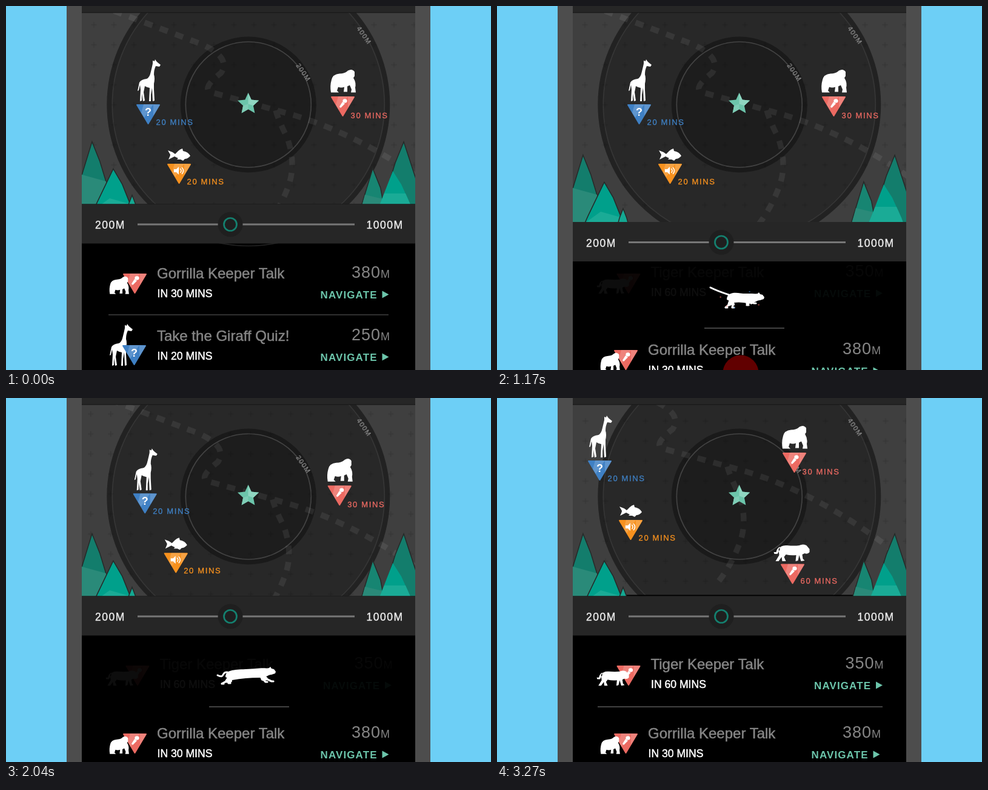
Write an HTML page that moves like this. It is 800x600 px and loops after 3.3 s.

```html
<!DOCTYPE html>
<html lang="en">
<head>
<meta charset="utf-8">
<title>Pull to refresh</title>
<style>
  html, body { margin: 0; width: 100%; height: 100%; overflow: hidden; background: #6dcff6; }
  svg { display: block; font-family: "Liberation Sans", Arial, sans-serif; }
  .title { font-size: 24px; fill: #858585; stroke: #858585; stroke-width: .5px; }
  .when { font-size: 17.6px; fill: #fff; stroke: #fff; stroke-width: .5px; }
  .go { font-size: 17px; font-weight: bold; letter-spacing: 1.1px; fill: #6cc5ab; }
  .far { font-size: 27px; letter-spacing: 1px; fill: #858585; }
  .unit { font-size: 18px; letter-spacing: 0; }
  .range { font-size: 17.5px; letter-spacing: 1.5px; fill: #eee; stroke: #eee; stroke-width: .4px; }
  .mins { font-size: 13px; letter-spacing: 1.65px; stroke-width: .3px; }
  .ring { font-size: 11px; letter-spacing: 1.5px; fill: #8c8c8c; stroke: #8c8c8c; stroke-width: .2px; }
</style>
</head>
<body>
<svg id="stage" width="800" height="600" viewBox="0 0 800 600"></svg>
<script>
const BLUE = '#3f80c4', RED = '#ec6a62', ORANGE = '#f7911e', TEAL = '#6cc5ab';

const shapes = {
  giraffe: 'M25 2L28 3L29 0L31 3L33 5L38 9L36 12L30 11Q27 17 27 25Q29 31 27 40L27 50L28 68L25 69L24 47L22 58L22 69L19 69L20 47Q15 46 12 44L10 54L12 68L9 69L7 56L7 68L4 69L5 50L4 42L2 51L0 52L3 38Q6 33 15 32Q20 30 22 20Q24 12 25 7Z',
  gorilla: 'M29 2Q36 -2 40 4L40 11L38 14Q43 22 41 30L42 38L34 38L35 33L32 26L28 28L28 37L22 37L23 29Q18 31 13 29L11 35L14 38L1 38Q-1 27 2 17Q4 8 15 7Q24 7 29 2Z',
  fish: 'M0 3Q7 5 12 9L17 4Q20 1 24 0L25 4Q33 5 37 12Q33 17 28 17L25 20L21 18L15 18L17 16L11 13Q7 15 1 18Q4 12 4 10Z',
  tiger: 'M8 8Q12 1 22 2Q34 3 42 2Q48 -1 54 2L59 8L59 13Q56 17 51 15L47 17L48 24L51 27L45 28L42 18L40 27L36 28L37 18Q28 19 20 17L17 21L20 28L14 28L13 21L8 28L3 28L9 18ZM10 4Q5 7 4 13L0 13L1 16L6 16L10 9Z'
};

const icons = {
  quiz: '<text x="19.5" y="19" text-anchor="middle" font-size="18" font-weight="bold" fill="#fff">?</text>',
  talk: '<ellipse cx="23" cy="7.5" rx="3.6" ry="3.2" fill="#fff"/><path d="M19 9L23 12L16 19L14 17Z" fill="#fff"/>',
  sound: '<path d="M11 9h4l4-4v13l-4-4h-4z" fill="#fff"/><path d="M21.5 8q3 3.5 0 7M24 6q5 5.5 0 11" fill="none" stroke="#fff" stroke-width="1.5"/>'
};

const animal = (name, x, y, scale = 1) =>
  `<path d="${shapes[name]}" fill="#fff" transform="translate(${x} ${y}) scale(${scale})"/>`;

const badge = (x, y, color, icon) => `<g transform="translate(${x} ${y})">
  <path d="M1 1H38L19.5 32Z" fill="${color}" stroke="${color}" stroke-width="2" stroke-linejoin="round"/>
  <path d="M12 0L28 0L13 22L8 14ZM28 0L39 1L28 19Z" fill="#fff" opacity=".17"/>${icons[icon]}</g>`;

const marker = (name, ax, ay, bx, by, color, icon, mins, drop = 34) =>
  animal(name, ax, ay) + badge(bx, by, color, icon) +
  `<text class="mins" x="${bx + 32.5}" y="${by + drop}" fill="${color}" stroke="${color}">${mins} MINS</text>`;

const row = (title, mins, far, art) => `${art}
  <text class="title" x="249" y="449">${title}</text>
  <text class="when" x="249.5" y="480">IN ${mins} MINS</text>
  <text class="far" x="633" y="448" text-anchor="end">${far}<tspan class="unit">M</tspan></text>
  <text class="go" x="518.5" y="481.5">NAVIGATE</text><path d="M620.5 469.5L631.5 475.500L620.5 481.5Z" fill="${TEAL}"/>`;

const disc = (r, fill, stroke = 'none') =>
  `<circle cx="399.8" cy="162.5" r="${r}" fill="${fill}" stroke="${stroke}" stroke-width="1.7"/>`;

const poly = (points, fill) => `<polygon points="${points}" fill="${fill}"/>`;

const star = () => {
  const at = i => {
    const r = i % 2 ? 8.8 : 18.5, a = (i / 5 - .5) * Math.PI;
    return [399.5 + r * Math.cos(a), 161.5 + r * Math.sin(a)].map(v => v.toFixed(1)).join();
  };
  const ids = [...Array(10).keys()];
  return poly(ids.map(at).join(' '), TEAL) +
    poly([at(0), at(1), at(2), at(3), '399.5,161.5'].join(' '), '#8fd6c1') +
    poly([at(5), at(6), at(7), '399.5,161.5'].join(' '), '#7fcdb6');
};

// A tree has a dark outline behind it and a lighter facet at its foot
const tree = (outline, fill, facet, light) =>
  `<polygon points="${outline}" fill="none" stroke="#252928" stroke-width="3"/>` +
  poly(outline, fill) + poly(facet, light);

const trees =
  tree('110,330 142,226 154,256 165,292 182,380 110,380', '#137d6c',
    '110,274 125,278 165,289 182,380 110,380', '#2a8a79') +
  tree('177,270 191,294 205,329 224,380 126,380 151,324', '#00a08b',
    '146,335 171,317 203,326 224,380 126,380', '#1aab96') +
  tree('208,314 213,327 228,380 188,380 203,327', '#14a892', '', 'none') +
  tree('690,330 656,226 643,258 630,300 610,380 690,380', '#137d6c', '', 'none') +
  tree('605,270 617,300 632,380 572,380 588,326', '#178572',
    '592,311 621,318 632,380 572,380 588,326', '#2a8a79') +
  poly('638,272 652,294 667,327 686,380 594,380 617,326', '#00a08b') +
  poly('624,309 659,309 667,327 686,380 594,380 617,326', '#1aab96');

const road = 'M178 8L320 62Q372 84 355 110Q322 136 338 142L475 180Q598 217 720 312M445 172Q450 190 463 215Q478 255 468 290Q455 330 430 362';

stage.innerHTML = `
<defs>
  <pattern id="plus" x="128.5" y="14.5" width="33" height="33" patternUnits="userSpaceOnUse">
    <path d="M12 16.5h9M16.5 12v9" stroke="#000" stroke-opacity=".13" stroke-width="1.6"/></pattern>
  <clipPath id="listArea"><path d="M125 380H675V600H125Z"/></clipPath>
  <clipPath id="below"><path d="M125 391H675V600H125Z"/></clipPath>
</defs>
<rect x="125" width="550" height="600" fill="#3f3f3f"/>
${disc(233.5, '#222')}${disc(224.5, '#282828', '#363636')}${disc(112, '#1a1a1a')}${disc(103.5, '#1d1d1d', '#434343')}
<g id="ground">
  <rect x="100" y="0" width="680" height="480" fill="url(#plus)"/>
  <path d="${road}" fill="none" stroke="#fff" stroke-opacity=".07" stroke-width="9.5" stroke-dasharray="14 13"/>
</g>
<text class="ring" transform="translate(478 98) rotate(55)">200M</text>
<text class="ring" transform="translate(578 37) rotate(55)">400M</text>
${star()}
<g id="markers">
  ${marker('giraffe', 217, 88, 215, 162, BLUE, 'quiz', 20)}
  ${marker('gorilla', 535, 104.5, 536, 149, RED, 'talk', 30, 36)}
  ${marker('fish', 267, 235, 266, 260, ORANGE, 'sound', 20)}
  <g id="newMarker">${marker('tiger', 521.5, 300, 533, 332.5, RED, 'talk', 60, 32.5)}</g>
</g>
<path id="edge" d="M125 325.5H675" stroke="#000" stroke-width="2"/>
<g id="forest">${trees}</g>
<rect id="sheet" x="125" y="326" width="550" height="400" fill="#000"/>
<g clip-path="url(#listArea)">
  <g id="ghost">${row('Tiger Keeper Talk', 60, 350, badge(193, 443, RED, 'talk') + animal('tiger', 160, 451, .9))}</g>
  <g id="rows">
    ${row('Gorrilla Keeper Talk', 30, 380, badge(193, 441, RED, 'talk') + animal('gorilla', 170.5, 445.5, .77))}
    <path d="M169 509H631" stroke="#303030" stroke-width="2"/>
    <g transform="translate(0 103)">${row('Take the Giraff Quiz!', 20, 250, animal('giraffe', 171, 421) + badge(192, 456, BLUE, 'quiz'))}</g>
  </g>
  <path id="divider" stroke="#424242" stroke-width="1.8"/>
  <g id="cat" stroke="#fff" fill="none" stroke-linecap="round" stroke-linejoin="round">
    <path id="tail" stroke-width="3"/><path id="shins" stroke-width="3.2"/><path id="thighs" stroke-width="6"/>
    <path id="torso" fill="#fff" stroke="none"/>
    <path id="head" d="M-8 -5L-4 -6L-2 -8L0 -5L4 -4L7 0L6 3L0 5L-7 6Z" fill="#fff" stroke="none"/>
  </g>
  <g id="sparks">${'<circle r="1.3"/>'.repeat(5)}</g>
  <circle id="touch" cx="402" r="29.5" fill="#f00"/>
</g>
<g id="arc" clip-path="url(#below)">${disc(233, 'none', '#222')}</g>
<g id="bar">
  <rect x="125" y="326.5" width="550" height="65" fill="#262626"/>
  <path d="M217 360H575" stroke="#777" stroke-width="3"/>
  <circle cx="370" cy="360" r="20.5" fill="#1f1f1f"/>
  <circle cx="370" cy="360" r="10.5" fill="none" stroke="#14806f" stroke-width="2.7"/>
  <text class="range" x="147" y="367">200M</text><text class="range" x="594.5" y="367">1000M</text>
</g>
<rect x="125" width="550" height="10" fill="#262626"/><rect x="125" y="10" width="550" height="1.5" fill="#1b1b1b"/>
<path d="M0 0H100V600H0ZM700 0H800V600H700Z" fill="#6dcff6"/>
<path d="M100 0H125V600H100ZM675 0H700V600H675Z" fill="#4d4d4d"/>`;

const el = {};
document.querySelectorAll('[id]').forEach(node => el[node.id] = node);
const set = (id, name, value) => el[id].setAttribute(name, value);
const move = (id, x, y) => set(id, 'transform', `translate(${x} ${y})`);

const linear = p => p;
const quad = p => p < .5 ? 2 * p * p : 1 - 2 * (1 - p) ** 2;
const cubic = p => p < .5 ? 4 * p ** 3 : 1 - 4 * (1 - p) ** 3;
const ramp = (t, from, to, ease = quad) => ease(Math.min(1, Math.max(0, (t - from) / (to - from))));

// Poses: tail tip, hip, shoulder, head, two hind feet, two front feet (x, y pairs)
const gather = [-43, -17, -9, 0, 22, 1, 39, -1, -18, 16, -7, 16, 17, 12, 29, 9];
const stride = [-46, 3, -13, -1, 22, -2, 41, -1, -19, 13, -4, 14, 11, 15, 33, 16];
const stretch = [-46, 0, -26, 0, 26, -4, 43, -6, -39, 14, -28, 13, 43, 10, 33, 11];
const gait = [[0, gather], [.333, stride], [.611, stretch], [.833, stride], [1, gather]];

function drawCat(t, drop) {
  const phase = ((t - 1170) / 540 % 1 + 1) % 1;
  const i = gait.findIndex(([at]) => at > phase + 1e-6);
  const [[from, a], [to, b]] = [gait[i - 1], gait[i]];
  const p = ramp(phase, from, to);
  const v = a.map((n, k) => +(n + (b[k] - n) * p).toFixed(2));
  const [tx, ty, hx, hy, sx, sy, nx, ny] = v;
  const mx = (hx + sx) / 2, my = (hy + sy) / 2;
  let shins = '', thighs = '';
  for (let k = 8; k < 16; k += 2) {
    const hind = k < 12, x = hind ? hx : sx, y = (hind ? hy : sy) + 3;
    const kx = (x + v[k]) / 2 + (hind ? 2 : -1), ky = (y + v[k + 1]) / 2 + 1;
    thighs += `M${x} ${y}L${kx} ${ky}`;
    shins += `M${kx} ${ky}L${v[k]} ${v[k + 1]}l3 0`;
  }
  set('tail', 'd', `M${tx} ${ty}C${tx + 14} ${ty + 7} ${hx - 16} ${hy - 9} ${hx} ${hy - 4}`);
  set('shins', 'd', shins);
  set('thighs', 'd', thighs);
  set('torso', 'd', `M${hx - 7} ${hy + 3}C${hx - 7} ${hy - 9} ${hx + 6} ${hy - 9} ${mx} ${my - 8}
    S${sx} ${sy - 9} ${nx - 2} ${ny - 5}L${nx - 3} ${ny + 5}Q${sx + 5} ${sy + 9} ${sx - 3} ${sy + 8}
    Q${mx} ${my + 6} ${hx + 4} ${hy + 8}Z`);
  move('head', nx, ny);
  move('cat', 395, 457 + drop);
}

function drawSparks(t, drop) {
  const age = (t - 1140) / 270, burst = Math.floor(age), grow = .75 + .3 * (age - burst);
  [...el.sparks.children].forEach((dot, i) => {
    const angle = [3.45, 5.1, 2.3, 1.9, .65][i] + burst * .3;
    dot.setAttribute('cx', 403 + 46 * grow * Math.cos(angle));
    dot.setAttribute('cy', 460 + drop + 18 * grow * Math.sin(angle));
    dot.setAttribute('fill', burst === 1 ? '#3f9c86' : i % 2 ? BLUE : RED);
  });
  set('sparks', 'opacity', t >= 1140 && t < 1950 ? .6 * (1 - (age - burst) * .5) : 0);
}

function draw(t) {
  const pull = ramp(t, 630, 990), release = ramp(t, 1440, 1740);
  const barDrop = 29.5 * (pull - release);
  const treeDrop = 22 * (ramp(t, 720, 1080) - ramp(t, 1500, 1890));
  const drop = 24 * (1 - release);
  move('bar', 0, barDrop);
  set('sheet', 'y', 326.5 + barDrop);
  move('forest', 0, treeDrop);
  move('rows', 0, 126 * pull - 14 * ramp(t, 1560, 1830));
  move('ghost', 4.5, -2 - 126 * (1 - pull));
  set('ghost', 'opacity', .05 + .95 * ramp(t, 2220, 2580));

  const pan = ramp(t, 1950, 2280, cubic);
  move('ground', -65 * pan, -59 * pan);
  move('markers', -65 * pan, -59 * pan);
  const pop = ramp(t, 2250, 2550);
  set('newMarker', 'opacity', pop);
  set('newMarker', 'transform', `translate(553 350) scale(${.5 + .5 * pop}) translate(-553 -350)`);
  set('edge', 'opacity', ramp(t, 2220, 2340));
  set('arc', 'opacity', t < 630 ? 1 : 0);

  const grow = ramp(t, 2130, 2490), half = 66 + 169 * grow, mid = 401 + 7 * (1 - release);
  set('divider', 'd', `M${mid - half} ${509 + 22 * (1 - release)}h${half * 2}`);
  set('divider', 'opacity', ramp(t, 870, 1110));

  set('cat', 'opacity', ramp(t, 750, 1050, p => p * p * (3 - 2 * p)) * (1 - ramp(t, 2130, 2310)));
  drawCat(t, drop);
  drawSparks(t, drop);
  set('touch', 'cy', 453 + 152 * pull);
  set('touch', 'opacity', .38 * ramp(t, 720, 990, linear) * (1 - ramp(t, 1200, 1350)));
}

let start;
function frame(now) {
  start ??= now;
  draw(Math.floor((now - start) % 3300 / 30 + .01) * 30);
  requestAnimationFrame(frame);
}
draw(0);
requestAnimationFrame(frame);
</script>
</body>
</html>
```
